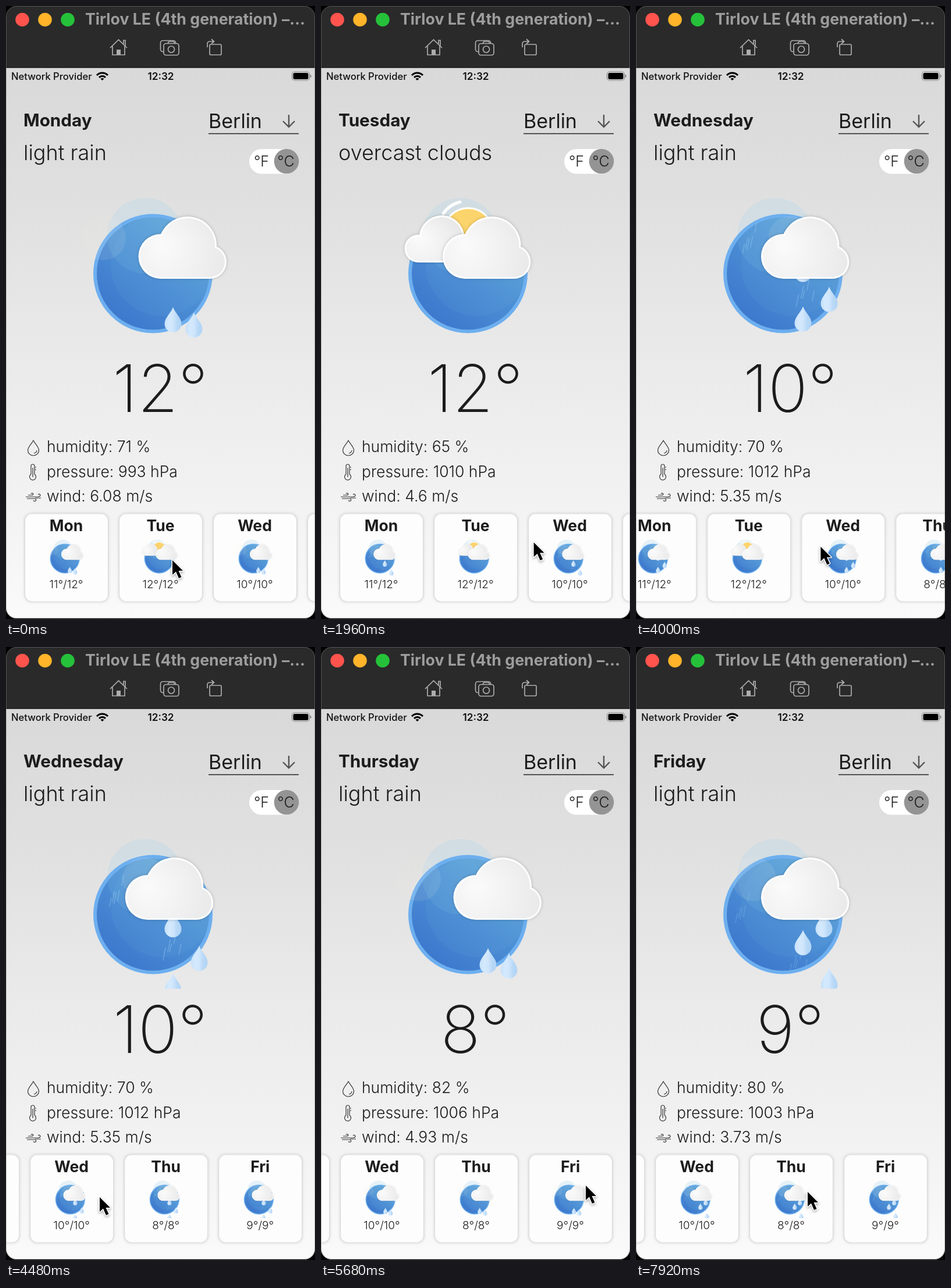
An HTML page with a canvas for the animation above (7960 ms loop, 531 px wide and 1054 px high).

```html
<!DOCTYPE html>
<html lang="en">
<head>
<meta charset="utf-8">
<title>Weather app</title>
<style>
html, body { margin: 0; width: 100%; height: 100%; overflow: hidden; background: #000; }
canvas { display: block; }
</style>
</head>
<body>
<canvas id="stage" width="531" height="1054"></canvas>
<script>
const c = document.getElementById('stage').getContext('2d');
const LOOP = 7960, STEP = 40, ICON_LOOP = 2840, TAU = Math.PI * 2;
const SCROLL = { start: 3756, length: 800, distance: 323 };
const BALL = { x: 252.5, y: 460, r: 102.5 };
const INK = '#1c1c1c';

// "at" is the moment the day gets selected
const days = [
  { at: 0, name: 'Monday', temp: 12, low: 11, humidity: 71, pressure: 993, wind: 6.08 },
  { at: 1480, name: 'Tuesday', temp: 12, humidity: 65, pressure: 1010, wind: 4.6, cloudy: true },
  { at: 3000, name: 'Wednesday', temp: 10, humidity: 70, pressure: 1012, wind: 5.35 },
  { at: 5160, name: 'Thursday', temp: 8, humidity: 82, pressure: 1006, wind: 4.93 },
  { at: 5960, name: 'Friday', temp: 9, humidity: 80, pressure: 1003, wind: 3.73 }
];

const pointerStops = [
  { at: 0, x: 285, y: 951 }, { at: 1200, x: 272, y: 927 }, { at: 1560, x: 271, y: 927 },
  { at: 2300, x: 438, y: 915 }, { at: 3780, x: 438, y: 915 }, { at: 4260, x: 160, y: 944 },
  { at: 4640, x: 160, y: 944 }, { at: 5640, x: 454, y: 924 }, { at: 6000, x: 454, y: 924 },
  { at: 6500, x: 294, y: 935 }, { at: LOOP, x: 294, y: 935 }
];

// Each drop falls at its own steady speed; y is its tip at 1200 ms
const drops = [
  { x: 287, y: 520, speed: .093 }, { x: 332, y: 485, speed: .0645 },
  { x: 287, y: 433, speed: .0515 }, { x: 323, y: 333, speed: .118 }
];
const frontCloud = [[266, 430.5, 38.5], [312, 412, 50], [350, 440, 29]];
const backCloud = [[161, 417, 24], [201, 399, 39], [235, 419, 22]];

const clamp = v => Math.max(0, Math.min(1, v));
const smooth = v => { v = clamp(v); return v * v * (3 - 2 * v); };
const mix = (a, b, p) => a + (b - a) * p;

function text(s, x, y, size, weight = 400, align = 'left', color = INK) {
  c.font = `${weight} ${size}px Inter, "Open Sans", sans-serif`;
  c.textAlign = align;
  c.fillStyle = color;
  c.fillText(s, x, y);
}

function disc(x, y, r, fill) {
  c.beginPath();
  c.arc(x, y, r, 0, TAU);
  c.fillStyle = fill;
  c.fill();
}

function box(x, y, w, h, r, fill, stroke, width = 1) {
  c.beginPath();
  c.roundRect(x, y, w, h, r);
  if (fill) { c.fillStyle = fill; c.fill(); }
  if (stroke) { c.strokeStyle = stroke; c.lineWidth = width; c.stroke(); }
}

function line(d, color, width) {
  c.strokeStyle = color;
  c.lineWidth = width;
  c.stroke(new Path2D(d));
}

function gradient(x0, y0, x1, y1, ...colors) {
  const g = c.createLinearGradient(x0, y0, x1, y1);
  colors.forEach((color, i) => g.addColorStop(i / (colors.length - 1), color));
  return g;
}

function clipBall() {
  c.beginPath();
  c.arc(BALL.x, BALL.y, BALL.r - 6, 0, TAU);
  c.clip();
}

function cloudPath(lobes, inset) {
  const [x, y, r] = lobes[0], end = lobes[2][0];
  c.beginPath();
  for (const [cx, cy, cr] of lobes) {
    c.moveTo(cx + cr - inset, cy);
    c.arc(cx, cy, cr - inset, 0, TAU);
  }
  c.rect(x, y - 2, end - x, r + 2 - inset);
}

function cloud(lobes, dx, scale) {
  const [x, y, r] = lobes[0];
  c.save();
  c.translate(dx, 0);
  c.save();
  c.shadowColor = 'rgba(0,0,0,.22)';
  c.shadowBlur = 5 * scale;
  cloudPath(lobes, 0);
  c.fillStyle = '#fff';
  c.fill();
  c.restore();
  cloudPath(lobes, 3);
  const g = c.createRadialGradient(x, y - 20, 5, x + 15, y, r * 2.7);
  g.addColorStop(0, '#fafafa');
  g.addColorStop(1, '#e8e8e9');
  c.fillStyle = g;
  c.fill();
  c.restore();
}

const dropShape = new Path2D('M0 0C3 10 14.5 18 14.5 29A14.5 14.5 0 0 1-14.5 29C-14.5 18-3 10 0 0Z');

function drop(x, y) {
  c.save();
  c.translate(x, y);
  c.fillStyle = gradient(-14, 0, 14, 0, '#c6e1fa', '#d4e9fd', '#d0e6fb', '#b8d8f7', '#b2d4f5');
  c.fill(dropShape);
  c.restore();
}

// Two groups of thin slanted lines sliding down the ball
function rainStreaks(t) {
  let seed = 7;
  const random = () => (seed = seed * 16807 % 2147483647) / 2147483647;
  const fall = (t - 1200) * .045;
  c.save();
  clipBall();
  c.strokeStyle = `rgba(160,205,245,${.4 * Math.sin(Math.PI * t / ICON_LOOP)})`;
  c.lineWidth = 1.5;
  c.beginPath();
  for (let i = 0; i < 10; i++) {
    const left = i < 5;
    const x = (left ? 186 : 234) + random() * (left ? 26 : 78) - fall * .25;
    const y = (left ? 360 : 468) + random() * (left ? 55 : 32) + fall;
    const length = 14 + random() * 9;
    c.moveTo(x, y);
    c.lineTo(x - length / 5, y + length);
  }
  c.stroke();
  c.restore();
}

function symbol(x, y, scale, cloudy, t) {
  const drift = -24 * clamp(1 - Math.abs(t - 1700) / 1140);
  c.save();
  c.translate(x, y);
  c.scale(scale, scale);
  c.translate(-252, -460);
  c.beginPath();
  c.rect(100, 300, 320, 287.5);
  c.clip();

  disc(239, 395, 65, 'rgba(178,215,234,.32)');
  disc(BALL.x, BALL.y, BALL.r, '#6dafef');
  disc(BALL.x, BALL.y, BALL.r - 6, gradient(310, 385, 190, 535, '#5da2d8', '#4b8dd4', '#3d78cd'));
  c.save();
  clipBall();
  disc(239, 395, 65, 'rgba(130,195,225,.16)');
  disc(268, 445, 88, 'rgba(130,195,225,.07)');
  c.restore();
  disc(mix(333, 168, t / ICON_LOOP), 399, 38, 'rgba(235,235,225,.1)');

  if (cloudy) {
    c.lineCap = 'round';
    line('M210 357Q221 341 239 337', '#fff', 5);
    c.lineCap = 'butt';
    disc(253, 390, 44, '#fff');
    disc(253, 390, 41, '#fcd46c');
    cloud(backCloud, -drift * .35, scale);
  } else {
    rainStreaks(t);
    for (const d of drops) {
      const tip = d.y + d.speed * (t - 1200);
      if (tip > 425) drop(d.x, tip);
    }
  }
  cloud(frontCloud, drift, scale);
  c.restore();
}

function titleBar() {
  const ink = '#adadad', bar = '#2a2a2a';
  c.fillStyle = bar;
  c.fillRect(0, 0, 531, 106);
  c.fillStyle = '#111';
  c.fillRect(0, 105, 531, 1.5);
  ['#ff544d', '#ffb429', '#26c13a'].forEach((color, i) => disc(28 + i * 39, 23.5, 11.8, color));
  text('Tirlov LE (4th generation) –…', 136, 32, 26.7, 700, 'left', '#9d9d9d');

  line('M179 72L193.5 58L208 72M183 69V84H204V69M202 65V59H205V68', ink, 1.7);
  box(190, 75, 7, 9, 0, ink);
  box(265.5, 59.5, 26, 19, 4, null, ink, 1.7);
  box(271, 64.5, 26, 20, 4, bar, ink, 1.7);
  line('M278 64L280 61H288L290 64M289.5 74.5A5.5 5.5 0 1 1 278.5 74.5A5.5 5.5 0 1 1 289.5 74.5', ink, 1.7);
  box(350, 66, 20, 18, 2, null, ink, 1.7);
  line('M346 71V65Q346 61 350 61H357M353 57L357.5 61L353 65', ink, 1.7);
}

function statusBar() {
  text('Network Provider', 9, 127, 16.6, 500, 'left', '#111');
  text('12:32', 266, 127, 17.2, 600, 'center', '#111');
  c.strokeStyle = '#000';
  for (const [r, width] of [[2, 4], [7.5, 3], [13, 3]]) {
    c.lineWidth = width;
    c.beginPath();
    c.arc(165.5, 128, r, -Math.PI * .76, -Math.PI * .24);
    c.stroke();
  }
  box(491.5, 113, 30, 15, 4.5, null, '#888', 1.2);
  box(493.5, 115, 26, 11, 2.5, '#000');
  box(522.5, 118, 2, 5, 1, '#888');
}

function header(day) {
  text(day.name, 30, 207, 29.7, 700);
  text(day.cloudy ? 'overcast clouds' : 'light rain', 30, 265, 36, 300);
  text('Berlin', 348, 210, 34);
  line('M348 219.5H503', '#222', 1.7);
  line('M486 187V208M476 198L486 208L496 198', '#555', 2.4);
  box(418, 246, 85, 42.5, 21, '#fff');
  disc(482, 267, 21.3, '#949494');
  text('°F', 439, 276, 25, 300, 'center');
  text('°C', 481, 276, 25, 300, 'center');
}

function details(day) {
  text(day.temp + '°', 265, 698, 113, 200, 'center');
  [`humidity: ${day.humidity} %`, `pressure: ${day.pressure} hPa`, `wind: ${day.wind} m/s`]
    .forEach((s, i) => text(s, 70, 767 + i * 42.5, 26.5, 300));
  line('M47 747C44 753 37.5 758 37.5 764A9.5 9 0 0 0 56.5 764C56.5 758 50 753 47 747ZM53 764A6 6 0 0 1 48 769', '#333', 1.2);
  line('M43 805V791A3 3 0 0 1 49 791V805A5.5 5.5 0 1 1 43 805ZM46 794V810M50 793H52M50 797H52', '#333', 1.2);
  line('M34 844H54Q59 844 59 841Q58 838 55 840M36 847H49Q53 848 51 851Q48 852 47 850M38 841H45Q48 840 46 838Q44 837 43 839M50 846H60', '#333', 1.2);
}

function cards(t, phase) {
  const scroll = SCROLL.distance * smooth((t - SCROLL.start) / SCROLL.length);
  days.forEach((day, i) => {
    const x = 32 + 162 * i - scroll, mid = x + 71.5;
    c.save();
    c.shadowColor = 'rgba(0,0,0,.18)';
    c.shadowBlur = 4;
    box(x, 872.5, 144, 152, 12, '#fdfdfd');
    c.restore();
    box(x + .5, 873, 143, 151, 12, null, '#dcdcdc', 1.2);
    text(day.name.slice(0, 3), mid, 903, 26.5, 700, 'center');
    symbol(mid - 2.5, 950, .25, day.cloudy, phase);
    text(`${day.low || day.temp}°/${day.temp}°`, mid, 1001, 19, 300, 'center');
  });
}

const arrow = new Path2D('M1 2V27L7 21.5L12 33L16.5 31L11.5 20H19Z');

function pointer(t) {
  const i = pointerStops.findIndex(s => s.at > t);
  const from = pointerStops[i - 1], to = pointerStops[i];
  const p = smooth((t - from.at) / (to.at - from.at));
  c.save();
  c.translate(mix(from.x, to.x, p), mix(from.y, to.y, p));
  c.shadowColor = 'rgba(0,0,0,.35)';
  c.shadowBlur = 4;
  c.shadowOffsetY = 2;
  c.lineJoin = 'round';
  c.strokeStyle = '#fff';
  c.lineWidth = 3;
  c.stroke(arrow);
  c.shadowColor = 'transparent';
  c.fillStyle = '#000';
  c.fill(arrow);
  c.restore();
}

function draw(t) {
  const phase = t % ICON_LOOP || ICON_LOOP; // each icon loop starts from its last pose
  const day = days.filter(d => d.at <= t).pop();
  c.fillStyle = '#000';
  c.fillRect(0, 0, 531, 1054);
  c.save();
  c.beginPath();
  c.roundRect(0, 0, 531, 1053, 18);
  c.clip();
  c.fillStyle = gradient(0, 107, 0, 1054, '#d9d9d9', '#e0e0e0', '#e9e9e9', '#f1f1f1', '#fafafa');
  c.fillRect(0, 106, 531, 948);
  titleBar();
  statusBar();
  header(day);
  symbol(252, 460, 1, day.cloudy, phase);
  details(day);
  cards(t, phase);
  box(.5, .5, 530, 1052, 18, null, 'rgba(130,130,130,.5)');
  c.restore();
  pointer(t);
}

const start = performance.now();
function tick() {
  const t = (performance.now() - start) % LOOP;
  draw(Math.floor(t / STEP) * STEP);
  requestAnimationFrame(tick);
}
tick();
</script>
</body>
</html>
```
